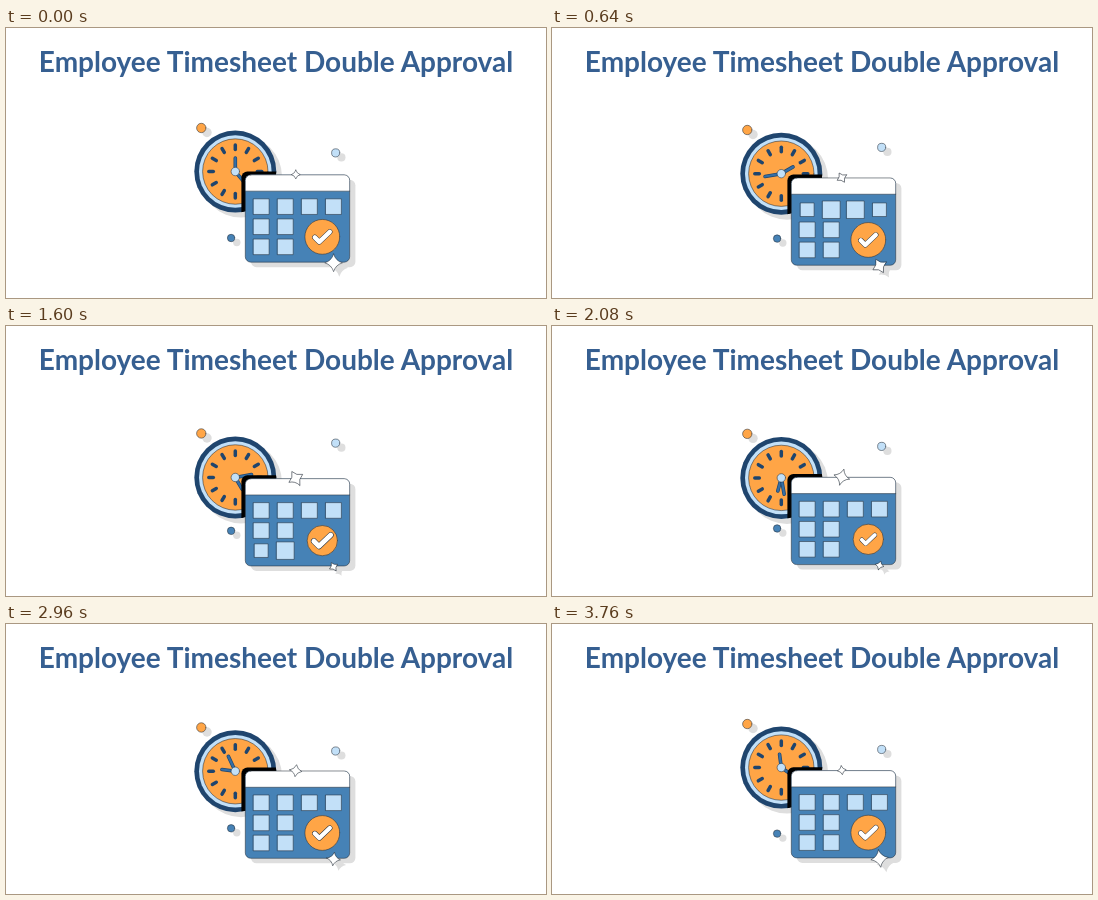
An HTML page with a canvas for the animation above (3.84 s loop, 540x270 px).

```html
<!DOCTYPE html>
<html lang="en">
<head>
<meta charset="utf-8">
<title>Employee Timesheet Double Approval</title>
<style>
  html, body { margin: 0; width: 100%; height: 100%; overflow: hidden; background: #fff; }
  canvas { position: absolute; left: 0; top: 0; width: 540px; height: 270px; }
  h1 {
    position: absolute; left: 0; top: 13px; width: 540px; margin: 0;
    font: bold 28px/40px Lato, sans-serif; color: #365f91;
    text-align: center; white-space: nowrap;
  }
</style>
</head>
<body>
<canvas id="stage"></canvas>
<h1>Employee Timesheet Double Approval</h1>
<script>
const LOOP = 3840, STEP = 80, TAU = Math.PI * 2;
const NAVY = '#1f456e', BLUE = '#4682b6', SKY = '#c2e0f8', ORANGE = '#ffa546';
const LINE = '#262f3a', SHADOW = '#dedede';
const SHIFT = { x: 5.7, y: 5 };

const canvas = document.getElementById('stage');
const ratio = window.devicePixelRatio || 1;
canvas.width = 540 * ratio;
canvas.height = 270 * ratio;
const ctx = canvas.getContext('2d');
ctx.scale(ratio, ratio);
ctx.lineCap = ctx.lineJoin = 'round';

// Sine bobbing, highest value at time `peak`.
const bob = (t, mid, amp, peak) => mid + amp * Math.cos(TAU * (t - peak) / LOOP);

function paint(fill, stroke, width = 0.55) {
  if (fill) { ctx.fillStyle = fill; ctx.fill(); }
  if (stroke) { ctx.strokeStyle = stroke; ctx.lineWidth = width; ctx.stroke(); }
}

function disc(x, y, r, fill, stroke, width) {
  ctx.beginPath();
  ctx.arc(x, y, r, 0, TAU);
  paint(fill, stroke, width);
}

function box(x, y, w, h, r, fill, stroke) {
  ctx.beginPath();
  ctx.roundRect(x, y, w, h, r);
  paint(fill, stroke);
}

function path(points, stroke, width) {
  ctx.beginPath();
  points.forEach(([x, y]) => ctx.lineTo(x, y));
  paint(null, stroke, width);
}

function star(x, y, r, angle, fill, stroke) {
  const k = r * 0.23;
  ctx.save();
  ctx.translate(x, y);
  ctx.rotate(angle);
  ctx.beginPath();
  ctx.moveTo(0, -r);
  ctx.quadraticCurveTo(k, -k, r, 0);
  ctx.quadraticCurveTo(k, k, 0, r);
  ctx.quadraticCurveTo(-k, k, -r, 0);
  ctx.quadraticCurveTo(-k, -k, 0, -r);
  ctx.closePath();
  paint(fill, stroke);
  ctx.restore();
}

function dot(x, y, r, fill) {
  disc(x + SHIFT.x, y + 4.5, r, SHADOW);
  disc(x, y, r, fill, LINE);
}

// Dip, swell, dip and settle around time `peak`.
const PULSE = [1.14, 1.12, 1, 0.87, 0.93, 1];
function pulse(t, peak, stretch = 1) {
  const d = Math.abs(t - peak) / (80 * stretch);
  if (d >= 5) return 1;
  const i = Math.floor(d);
  return PULSE[i] + (PULSE[i + 1] - PULSE[i]) * (d - i);
}

function ray(x, y, angle, from, to) {
  const s = Math.sin(angle), c = -Math.cos(angle);
  return [[x + s * from, y + c * from], [x + s * to, y + c * to]];
}

function hand(x, y, angle, length) {
  const line = ray(x, y, angle, 0, length);
  path(line, NAVY, 3.6);
  path(line, '#356fa6', 2.2);
}

function clock(x, y, turn, calendarTop) {
  disc(x + SHIFT.x, y + SHIFT.y, 41, SHADOW);
  disc(x, y, 41, NAVY);
  disc(x, y, 36.3, SKY);
  disc(x, y, 32.7, ORANGE, LINE);
  for (let i = 0; i < 12; i++) path(ray(x, y, i * TAU / 12, 22, 26.5), NAVY, 3.5);
  hand(x, y, turn, 13.5);
  hand(x, y, 2 * turn + 140 * TAU / 360, 16.5);
  disc(x, y, 4.2, SKY, LINE);

  ctx.save();
  ctx.beginPath();
  ctx.arc(x, y, 41, 0, TAU);
  ctx.clip();
  box(235.4, calendarTop - 3.4, 104.5, 87, 6, '#000');
  ctx.restore();
}

function calendar(x, y, t) {
  const w = 104.4, h = 87.3;
  box(x, y, w, h, 5.5, BLUE);
  box(x, y, w, 16.3, [5.5, 5.5, 0, 0], '#fff');
  path([[x, y + 16.3], [x + w, y + 16.3]], LINE);
  box(x, y, w, h, 5.5, null, LINE);

  for (let k = 0; k < 8; k++) {
    const col = k < 4 ? k : k % 2;
    const row = k < 4 ? 0 : k < 6 ? 1 : 2;
    const size = 15.6 * pulse(t, 400 + 160 * k);
    box(x + 16 + 24.1 * col - size / 2, y + 31.8 + 20.1 * row - size / 2, size, size, 0, SKY, LINE);
  }

  ctx.save();
  ctx.translate(x + 77, y + 62);
  disc(0, 0, 17.4 * pulse(t, 1840), ORANGE, LINE);
  const s = pulse(t, 1720, 1.5);
  ctx.scale(s, s);
  const mark = [[-7.5, 0.5], [-3, 5], [7.5, -5]];
  path(mark, LINE, 5.3);
  path(mark, '#fff', 4.4);
  ctx.restore();
}

function draw(t) {
  const turn = TAU * t / LOOP;
  const clockY = bob(t, 147.8, 4.25, LOOP / 2);
  const top = bob(t, 149.4, 3.3, 1500);
  const low = { x: 327.6, y: top + 88, r: bob(t, 6.6, 2.2, 0) };

  ctx.clearRect(0, 0, 540, 270);
  dot(195.3, bob(t, 104, 4, LOOP / 2), 4.7, ORANGE);
  dot(329.7, bob(t, 122, 5.5, 1300 + LOOP / 2), 4.1, SKY);
  dot(225.1, bob(t, 206.5, 4.4, 400), 3.7, BLUE);

  star(low.x + SHIFT.x, low.y + SHIFT.y, low.r, turn, SHADOW);
  box(239.3 + SHIFT.x, top + SHIFT.y, 104.4, 87.3, 5.5, SHADOW);
  clock(229.3, clockY, turn, top);
  calendar(239.3, top, t);
  star(289.8, top - 0.3, bob(t, 6.3, 1.9, LOOP / 2), turn, '#fff', LINE);
  star(low.x, low.y, low.r, turn, '#fff', LINE);
}

const start = performance.now();
function tick() {
  const t = (performance.now() - start) % LOOP;
  draw(Math.floor(t / STEP) * STEP);
  requestAnimationFrame(tick);
}
tick();
</script>
</body>
</html>
```
